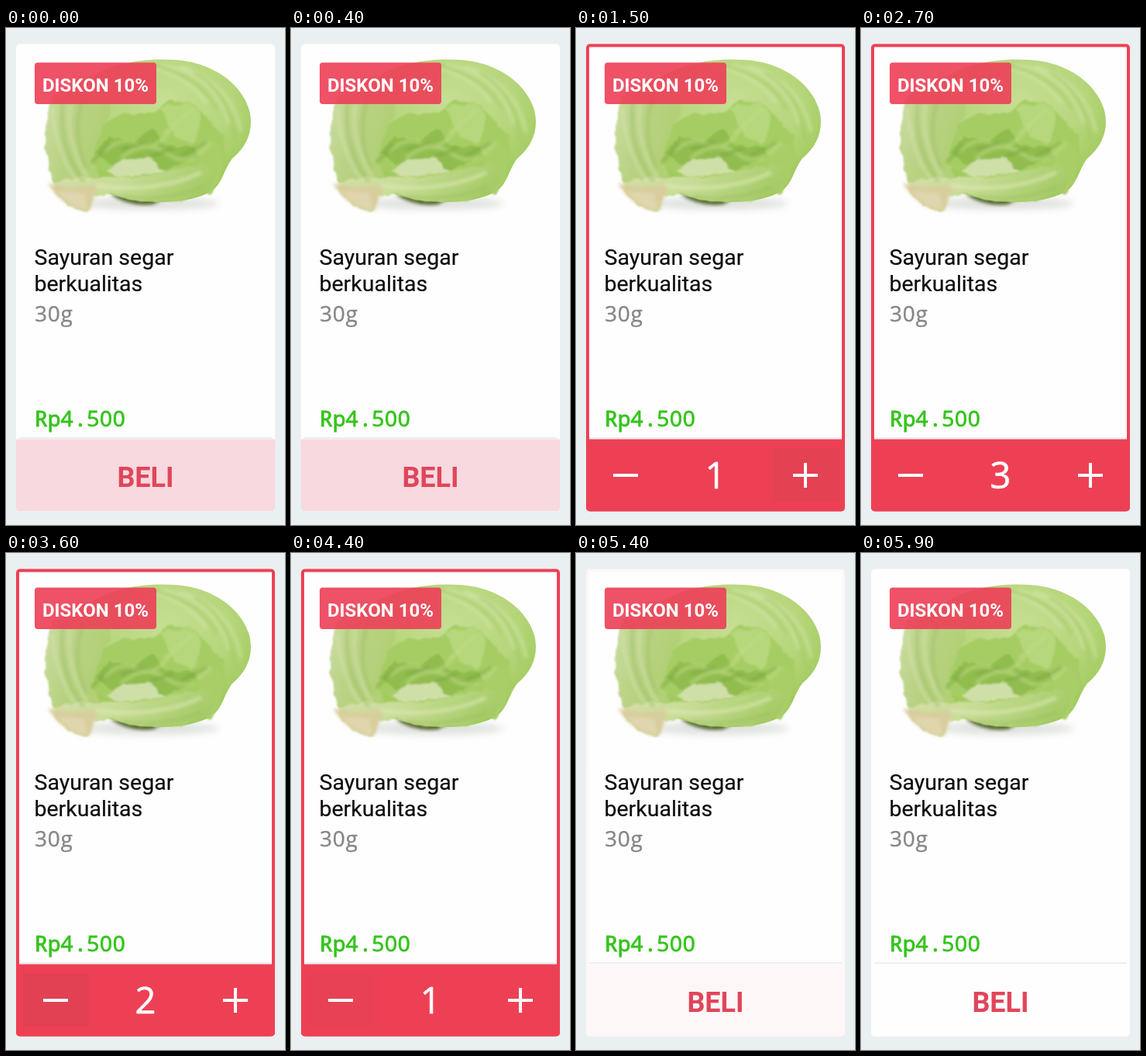
These frames come from a looping animation (360x640 px, 6.2 s). An HTML page:

```html
<!DOCTYPE html>
<html lang="id">
<head>
<meta charset="utf-8">
<title>Kartu produk</title>
<style>
  html, body { margin: 0; width: 100%; height: 100%; overflow: hidden; background: #eaf0f2; }
  svg { display: block; }
  text { font-family: Roboto, sans-serif; }
  .badge { font-size: 24px; font-weight: 700; fill: #fff; }
  .title { font-size: 28.5px; fill: #0c0c0c; stroke: #0c0c0c; stroke-width: .2; }
  .mono { font-family: "Noto Sans Mono", monospace; font-size: 28px; }
  .digit { font-family: "Open Sans", sans-serif; letter-spacing: .028em; }
  .unit { fill: #868686; stroke: #868686; stroke-width: .4; }
  .price { fill: #35c41c; stroke: #35c41c; stroke-width: .9; }
  .beli { font-size: 36px; font-weight: 700; fill: #e0465b; text-anchor: middle; }
  .count text { font-family: "Open Sans", sans-serif; font-size: 47px; fill: #fff; stroke: #fff; stroke-width: .7; text-anchor: middle; }
  .icon { stroke: #fff; stroke-width: 4; fill: none; }
  .press { fill: #8c4a4a; opacity: 0; }

  .bar, .edge, .beli, .step, .strip, .press { animation: 6.2s linear infinite; }
  .bar { animation-name: bar; }
  .edge { animation-name: edge; }
  .beli { animation-name: beli; animation-timing-function: step-end; }
  .step { animation-name: step; animation-timing-function: step-end; }
  .strip { animation-name: strip; animation-timing-function: step-end; }
  .plus { animation-name: plus; }
  .minus { animation-name: minus; }

  @keyframes bar {
    0%, 9.68% { fill: #f8d9e0; }
    16.3%, 79.35% { fill: #ee4055; }
    87.4%, 100% { fill: #fefefe; }
  }
  @keyframes edge {
    0%, 9.68% { opacity: 0; }
    16.3%, 79.35% { opacity: 1; }
    87.4%, 100% { opacity: 0; }
  }
  @keyframes beli {
    0% { opacity: 1; }
    11.3% { opacity: 0; }
    84.7%, 100% { opacity: 1; }
  }
  @keyframes step {
    0% { opacity: 0; }
    11.3% { opacity: 1; }
    84.7%, 100% { opacity: 0; }
  }
  @keyframes strip {
    0% { transform: translateY(-93px); }
    25.8% { transform: translateY(-186px); }
    37.1% { transform: translateY(-279px); }
    57.2% { transform: translateY(-186px); }
    68.5% { transform: translateY(-93px); }
    79%, 100% { transform: translateY(0); }
  }
  @keyframes plus {
    0%, 22.6% { opacity: 0; }
    24.2%, 27% { opacity: .1; }
    29%, 34% { opacity: 0; }
    35.5%, 38.5% { opacity: .1; }
    40.5%, 100% { opacity: 0; }
  }
  @keyframes minus {
    0%, 55.6% { opacity: 0; }
    57.2%, 59% { opacity: .12; }
    61%, 66.2% { opacity: 0; }
    67.8%, 70% { opacity: .12; }
    72%, 77.4% { opacity: 0; }
    79%, 81.5% { opacity: .12; }
    83.5%, 100% { opacity: 0; }
  }
</style>
</head>
<body>
<svg width="360" height="640" viewBox="0 0 360 640">
  <defs>
    <radialGradient id="head" cx=".5" cy=".3" r=".62">
      <stop offset="0" stop-color="#c6de94"/>
      <stop offset=".6" stop-color="#b7d67c"/>
      <stop offset="1" stop-color="#a0ca5c"/>
    </radialGradient>
    <linearGradient id="belly" x2="1" y2=".3">
      <stop offset="0" stop-color="#d8dbab"/>
      <stop offset=".45" stop-color="#c9dd98"/>
      <stop offset="1" stop-color="#a5cb66"/>
    </linearGradient>
    <linearGradient id="side" x2="1" y2=".6">
      <stop offset="0" stop-color="#cfdfa8"/>
      <stop offset=".5" stop-color="#b9d283"/>
      <stop offset="1" stop-color="#b0cf72"/>
    </linearGradient>
    <filter id="ruffle" x="-5%" y="-5%" width="110%" height="110%">
      <feTurbulence type="fractalNoise" baseFrequency=".07" numOctaves="2" seed="4"/>
      <feDisplacementMap in="SourceGraphic" scale="9" xChannelSelector="R" yChannelSelector="G"/>
      <feGaussianBlur stdDeviation="1.2"/>
    </filter>
    <filter id="soft" x="-30%" y="-60%" width="160%" height="220%">
      <feGaussianBlur stdDeviation="5"/>
    </filter>
    <filter id="blend" x="-20%" y="-20%" width="140%" height="140%">
      <feGaussianBlur stdDeviation="2"/>
    </filter>
    <clipPath id="card"><rect x="13" y="20.5" width="334" height="602" rx="5"/></clipPath>
  </defs>

  <rect x="13" y="20.5" width="334" height="602" rx="5" fill="#fefefe"/>

  <g class="lettuce">
    <ellipse cx="185" cy="226" rx="90" ry="8" fill="#dfe2de" filter="url(#soft)"/>
    <path d="M134 214Q160 231 190 227L206 218Z" fill="#53642f" filter="url(#blend)"/>
    <path d="M112 62C145 42 195 37 234 43C270 49 304 72 314 106C320 130 312 152 292 168C280 184 279 203 262 212C235 226 190 226 160 221L92 202Z" fill="url(#head)"/>
    <g filter="url(#ruffle)">
      <path d="M55 98C70 72 100 60 134 62L134 112L112 166L122 200L100 214L62 200C52 180 47 130 55 98Z" fill="url(#side)"/>
      <path d="M126 124L146 112L192 108L212 92L246 100L280 140L284 168L268 196L214 186L138 193L108 174Z" fill="#a6cd64"/>
      <path d="M113 162L133 140L164 146L188 132L205 150L236 152L262 160L230 172L208 184L172 168L142 178Z" fill="#91bd50"/>
      <path d="M130 183Q155 163 188 168L206 186L146 194Z" fill="#cfdfa8"/>
      <path d="M198 104Q224 92 247 102Q256 126 240 150L217 139Z" fill="#b6d77b"/>
      <path d="M244 148Q279 140 280 170L275 199L264 214Q248 208 250 180Z" fill="#a9ce68"/>
    </g>
    <path d="M60 200C86 188 122 193 151 193C191 195 221 177 264 176C276 190 264 211 239 218C208 227 170 223 140 215L111 215L105 235C85 234 68 220 60 200Z" fill="url(#belly)" filter="url(#ruffle)"/>
    <path d="M54 200L83 206L119 203L108 235Q76 235 54 200Z" fill="#d8cd9c" filter="url(#blend)"/>
    <path d="M66 210L101 213L105 234Q82 231 66 210Z" fill="#e0d6ae" filter="url(#blend)"/>
    <g fill="none" stroke-linecap="round" filter="url(#blend)" opacity=".6">
      <path d="M202 48Q268 58 287 122M172 48Q232 58 258 96M226 50Q292 72 303 133" stroke="#d3e6a8" stroke-width="4"/>
      <path d="M190 48Q250 62 272 104M244 58Q288 82 296 145" stroke="#a0c662" stroke-width="3"/>
      <path d="M60 105Q64 160 91 196M83 100Q76 146 106 194" stroke="#dce7ba" stroke-width="3"/>
      <path d="M73 97Q67 153 99 196M99 90Q84 137 103 180" stroke="#9fbf68" stroke-width="4"/>
      <path d="M128 158Q150 138 171 150T218 124M149 167Q180 142 208 162T263 148M205 135L239 106" stroke="#c4de8a" stroke-width="4"/>
      <path d="M112 172L132 150M150 156L178 148M188 164L214 156M226 164L258 148" stroke="#6f9c38" stroke-width="3"/>
      <path d="M117 203Q192 213 250 187" stroke="#e0eabb" stroke-width="5"/>
      <path d="M151 217Q205 224 251 205" stroke="#9dbb5e" stroke-width="3"/>
    </g>
  </g>

  <rect x="37" y="44.5" width="157" height="53.5" rx="4" fill="#ee4058" opacity=".91"/>
  <text class="badge" x="47" y="81.5">DISKON 10%</text>

  <text class="title" x="36.5" y="305">Sayuran segar</text>
  <text class="title" x="36.5" y="338.5">berkualitas</text>
  <text class="mono digit unit" x="37" y="378">30g</text>
  <text class="mono price" x="37" y="513">Rp<tspan class="digit">4</tspan>.<tspan class="digit">500</tspan></text>

  <path d="M17 528H343" stroke="#eceef0" stroke-width="2"/>
  <rect class="edge" x="15" y="22.5" width="330" height="598" rx="3" fill="none" stroke="#ee4055" stroke-width="4"/>
  <g clip-path="url(#card)">
    <rect class="bar" x="13" y="529.5" width="334" height="93"/>
  </g>

  <text class="beli" x="180" y="590.5">BELI</text>

  <rect class="press minus" x="22" y="541" width="85" height="69"/>
  <rect class="press plus" x="254" y="541" width="86" height="69"/>
  <g class="step">
    <path class="icon" d="M48 576H80M280 576H312M296 560V592"/>
    <svg class="count" x="140" y="529" width="80" height="93" overflow="hidden">
      <g class="strip">
        <text x="40" y="64">0</text>
        <text x="40" y="157">1</text>
        <text x="40" y="250">2</text>
        <text x="40" y="343">3</text>
      </g>
    </svg>
  </g>
</svg>
</body>
</html>
```
